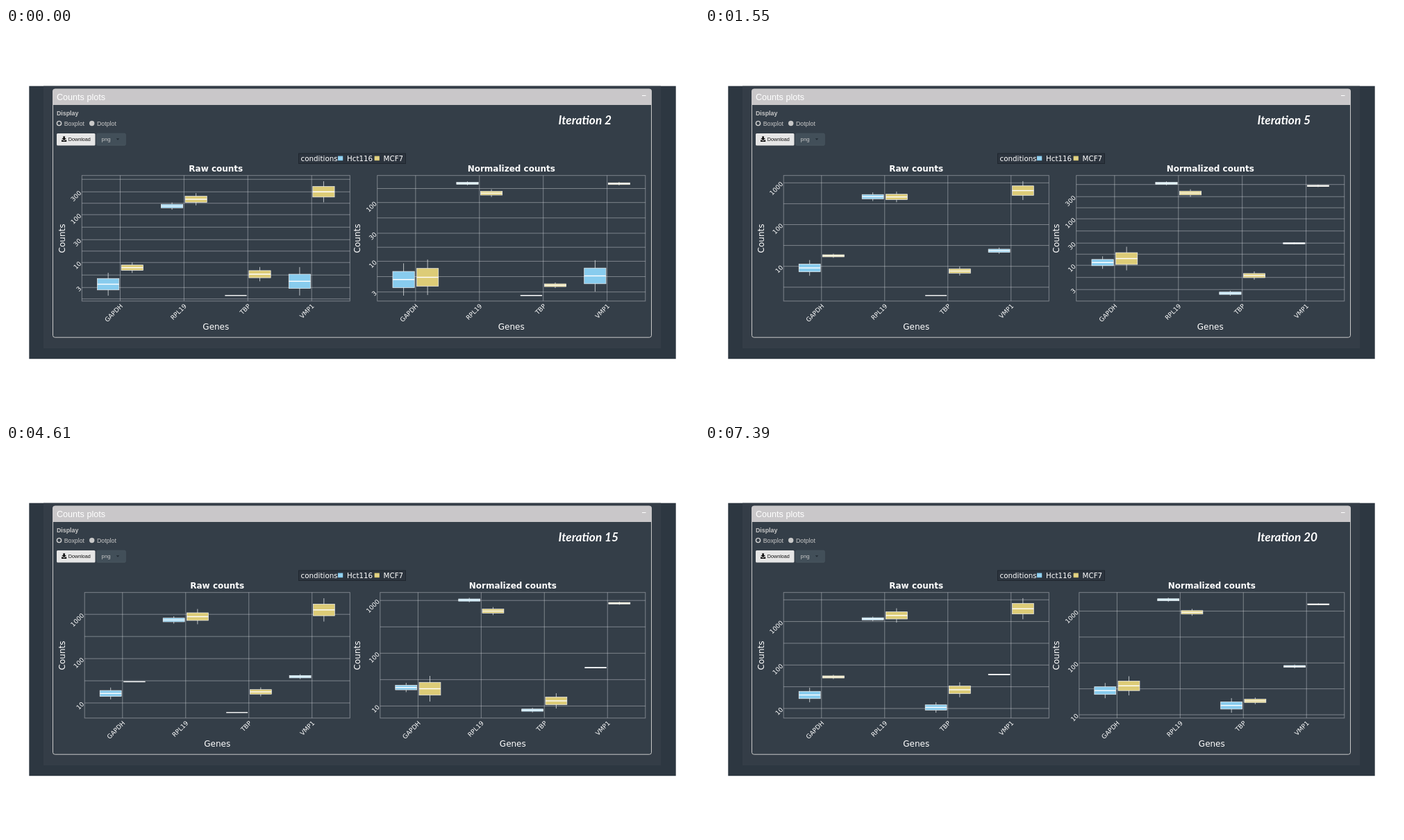
These frames come from a looping animation (998x561 px, 8.21 s). An HTML page:

```html
<!DOCTYPE html>
<html lang="en">
<head>
<meta charset="utf-8">
<title>Counts plots</title>
<style>
  html, body { margin: 0; width: 100%; height: 100%; overflow: hidden; background: #fff; }
  svg { display: block; width: 100%; height: 100%; }
  .ui { font-family: "Liberation Sans", Arial, sans-serif; font-size: 8.8px; fill: #c8c8c8; }
  .plot { font-family: "DejaVu Sans", sans-serif; font-size: 12px; fill: #fff; }
  .title { font-weight: bold; text-anchor: middle; }
  .mid { text-anchor: middle; }
  .tick { font-size: 9px; text-anchor: end; }
  .grid { fill: none; stroke: #dfe3e6; stroke-opacity: .42; stroke-width: 1; }
  .whisker { stroke: #e8ecee; stroke-opacity: .75; stroke-width: 1; }
  .box { stroke: #f2f2f2; stroke-width: .7; }
  .median { stroke: #fff; stroke-width: 1.4; }
  #caption { font: italic bold 17.3px Lato, sans-serif; fill: #fff; }
</style>
</head>
<body>
<svg viewBox="0 0 998 561">
  <rect x="33.3" y="83.7" width="931.4" height="393.5" fill="#2d3741"/>
  <rect x="54" y="83.7" width="889" height="378.3" fill="#343d47"/>

  <g class="ui">
    <rect x="67.5" y="88" width="862" height="358.2" rx="3" fill="#343e48" stroke="#c8c8c8" stroke-width="1"/>
    <path d="M67.5 111V91a3 3 0 0 1 3-3h856a3 3 0 0 1 3 3v20z" fill="#c9c7c9"/>
    <text x="73" y="104" font-size="12.6" fill="#fff">Counts plots</text>
    <path d="M916 97.5h5.5" stroke="#fff"/>
    <text x="73" y="126" font-weight="bold">Display</text>
    <circle cx="76.5" cy="137.5" r="3.1" fill="#343e48" stroke="#d4d4d4" stroke-width="1.4"/>
    <text x="83.7" y="140.6">Boxplot</text>
    <circle cx="123.7" cy="137.5" r="3.7"/>
    <text x="131" y="140.6">Dotplot</text>
    <rect x="73" y="152" width="55.5" height="17.5" rx="1.5" fill="#e6e6e6"/>
    <path d="M82.3 156.3h2.6v2.8h2l-3.3 3.1-3.3-3.1h2zM80 161.5h1.4l2.2 1.5 2.2-1.5h1.4v2.6H80z" fill="#111"/>
    <text x="89.8" y="163.3" font-size="7.2" fill="#111">Download</text>
    <rect x="130.7" y="152.2" width="41.6" height="17" rx="1.5" fill="#424f59" stroke="#4d5a64" stroke-width=".7"/>
    <text x="137.6" y="163" font-size="7.8">png</text>
    <path d="M158.8 159.3h4.4l-2.2 2.4z" fill="#222b33"/>
  </g>

  <g class="plot" font-size="10.3">
    <rect x="421.5" y="181" width="154" height="14.5" fill="#2c343e" stroke="#1f262e" stroke-width="1"/>
    <g style="font-size:10.3px">
      <text x="424.6" y="191.8">conditions</text>
      <rect x="478" y="184.6" width="7.2" height="6.6" fill="#88ccee"/>
      <path d="M478 187.9h7.2" stroke="#fff" stroke-opacity=".5" stroke-width=".7"/>
      <text x="491" y="191.8">Hct116</text>
      <rect x="530.6" y="184.6" width="7.2" height="6.6" fill="#ddcc77"/>
      <path d="M530.6 187.9h7.2" stroke="#fff" stroke-opacity=".5" stroke-width=".7"/>
      <text x="543.6" y="191.8">MCF7</text>
    </g>
    <text class="mid" transform="translate(85.2 303.5) rotate(-90)">Counts</text>
    <text class="mid" transform="translate(510.2 303.5) rotate(-90)">Counts</text>
  </g>
  <g id="plots" class="plot"></g>
  <text id="caption" x="795.5" y="139.3"></text>
</svg>

<script>
const TOP = 212.7, BOTTOM = 393.8;
const GENES = ['GAPDH', 'RPL19', 'TBP', 'VMP1'];
const COLORS = ['#88ccee', '#ddcc77'];
const DECADES = [10, 100, 1000], HALVES = [3, 10, 30, 100, 300];

// Axis: left edge, y of 10, pixels per decade, labelled ticks.
// Boxes: median y and whisker reach, Hct116 then MCF7 for each gene.
const scenes = [
  { name: 2, ms: 1550,
    raw: { axis: [109.3, 338.2, 69, HALVES], boxes: [
      369.5, 16.5, 345.6, 7.6, 256.8, 5.2, 247, 8.8, 385.8, 0, 355, 10.3, 365.3, 20.5, 236.2, 15.2] },
    norm: { axis: [534.7, 336.4, 84.7, HALVES.slice(0, 4)], boxes: [
      362.7, 23.3, 359.5, 25.6, 224, 2.8, 238.2, 5.5, 385.8, 0, 371, 4, 357.5, 22.6, 224.5, 2.5] } },
  { name: 5, ms: 1550,
    raw: { axis: [113.2, 343.7, 60.2, DECADES], boxes: [
      346, 11.3, 328.5, 3, 243.3, 6.2, 243.6, 7.7, 385.8, 0, 350.5, 6.5, 321.2, 4.5, 234.5, 13.6] },
    norm: { axis: [534.7, 342.2, 67, HALVES], boxes: [
      338.3, 9, 332.5, 17, 224, 2.8, 238, 5.5, 382.5, 3.5, 357, 6, 310.5, 1.5, 227.7, 1.7] } },
  { name: 10, ms: 1510,
    raw: { axis: [113.2, 345.2, 59.1, DECADES], boxes: [
      340.5, 4.6, 325, 5.2, 244.6, 4.7, 242, 7.5, 377.2, 9, 347.1, 11, 319.6, 2.8, 234.2, 13.4] },
    norm: { axis: [534.7, 345.4, 66.7, HALVES], boxes: [
      333, 3.4, 331, 19, 224.5, 3.5, 237, 5.4, 374.5, 11.6, 355.5, .8, 309.4, 2, 227.7, 1.8] } },
  { name: 15, ms: 1550,
    raw: { axis: [113.2, 372, 63.9, DECADES], boxes: [
      358.3, 8.5, 341.4, .3, 252.3, 5.3, 247.5, 11, 385.8, 0, 356, 6.5, 334.1, 3.5, 237.8, 16.8] },
    norm: { axis: [538.8, 376.4, 76.1, DECADES], boxes: [
      349.7, 6.7, 351.5, 18.5, 223.6, 3.2, 239.5, 5.8, 382.4, 3.3, 369, 11, 321.1, .6, 228.2, 2.2] } },
  { name: 20, ms: 2050,
    raw: { axis: [113.2, 380, 62.7, DECADES], boxes: [
      360.5, 10.5, 334.5, 3.1, 250.7, 3.2, 245.8, 10.3, 378.5, 7.5, 353, 10.8, 331.1, 1, 236.1, 15.2] },
    norm: { axis: [538.8, 389, 74.7, DECADES], boxes: [
      354.2, 11, 347.3, 13.8, 223.2, 3, 241.3, 5, 375.6, 10.5, 369, 4.8, 319.3, 2.7, 229.7, 1.3] } }
];

const label = (cls, x, y, text) => `<text class="${cls}" x="${x}" y="${y}">${text}</text>`;
const slanted = (x, y, text) =>
  `<text class="tick" transform="translate(${x} ${y}) rotate(-45)" y="3.2">${text}</text>`;
const line = (cls, x1, y1, x2, y2) =>
  `<line class="${cls}" x1="${x1}" y1="${y1}" x2="${x2}" y2="${y2}"/>`;

// Major lines plus one halfway between each pair and one past each end.
function gridRows(majors) {
  const n = majors.length - 1, rows = [...majors];
  for (let i = 0; i < n; i++) rows.push((majors[i] + majors[i + 1]) / 2);
  // On a 3-10-30 axis the steps alternate, so the outer gap follows the next tick.
  const step = i => (majors[i] - majors[i + 1]) / 2;
  const even = Math.abs(step(0) - step(1)) < .01;
  rows.push(majors[0] + step(even ? 0 : 1));
  rows.push(majors[n] - step(even ? n - 1 : n - 2));
  return rows.filter(y => y > TOP + 2 && y < BOTTOM - 1);
}

function drawBox(x, unit, mid, reach, color) {
  const half = unit * .17, h = reach / 2;
  return line('whisker', x, mid - reach, x, mid + reach) +
    `<rect class="box" x="${x - half}" y="${mid - h}" width="${half * 2}" height="${reach}" fill="${color}"/>` +
    line('median', x - half, mid, x + half, mid);
}

function drawPlot(title, { axis: [left, y10, decade, ticks], boxes }, right) {
  const unit = (right - left) / 4.2, center = (left + right) / 2;
  const geneX = i => left + unit * (.6 + i);
  const majors = ticks.map(v => y10 - decade * (Math.log10(v) - 1));
  let out = `<rect class="grid" x="${left}" y="${TOP}" width="${right - left}" height="${BOTTOM - TOP}"/>`;
  for (const y of gridRows(majors)) out += line('grid', left, y, right, y);
  GENES.forEach((gene, i) => {
    out += line('grid', geneX(i), TOP, geneX(i), BOTTOM) + slanted(geneX(i) + 2, 399.4, gene);
  });
  ticks.forEach((v, i) => { out += slanted(left - 2.4, majors[i], v); });
  for (let i = 0; i < 8; i++) {
    const x = geneX(i >> 1) + unit * .188 * (i % 2 ? 1 : -1);
    out += drawBox(x, unit, boxes[2 * i], boxes[2 * i + 1], COLORS[i % 2]);
  }
  return out + label('title', center, 207.3, title) + label('mid', center, 435.4, 'Genes');
}

const plots = document.getElementById('plots');
const caption = document.getElementById('caption');
const total = scenes.reduce((sum, s) => sum + s.ms, 0);
let shown;

function show(scene) {
  if (scene === shown) return;
  shown = scene;
  plots.innerHTML = drawPlot('Raw counts', scene.raw, 495.3) +
    drawPlot('Normalized counts', scene.norm, 920.8);
  caption.textContent = 'Iteration ' + scene.name;
}

let start;
function frame(now) {
  start ??= now;
  let t = (now - start) % total;
  show(scenes.find(s => (t -= s.ms) < 0) || scenes[0]);
  requestAnimationFrame(frame);
}
show(scenes[0]);
requestAnimationFrame(frame);
</script>
</body>
</html>
```
